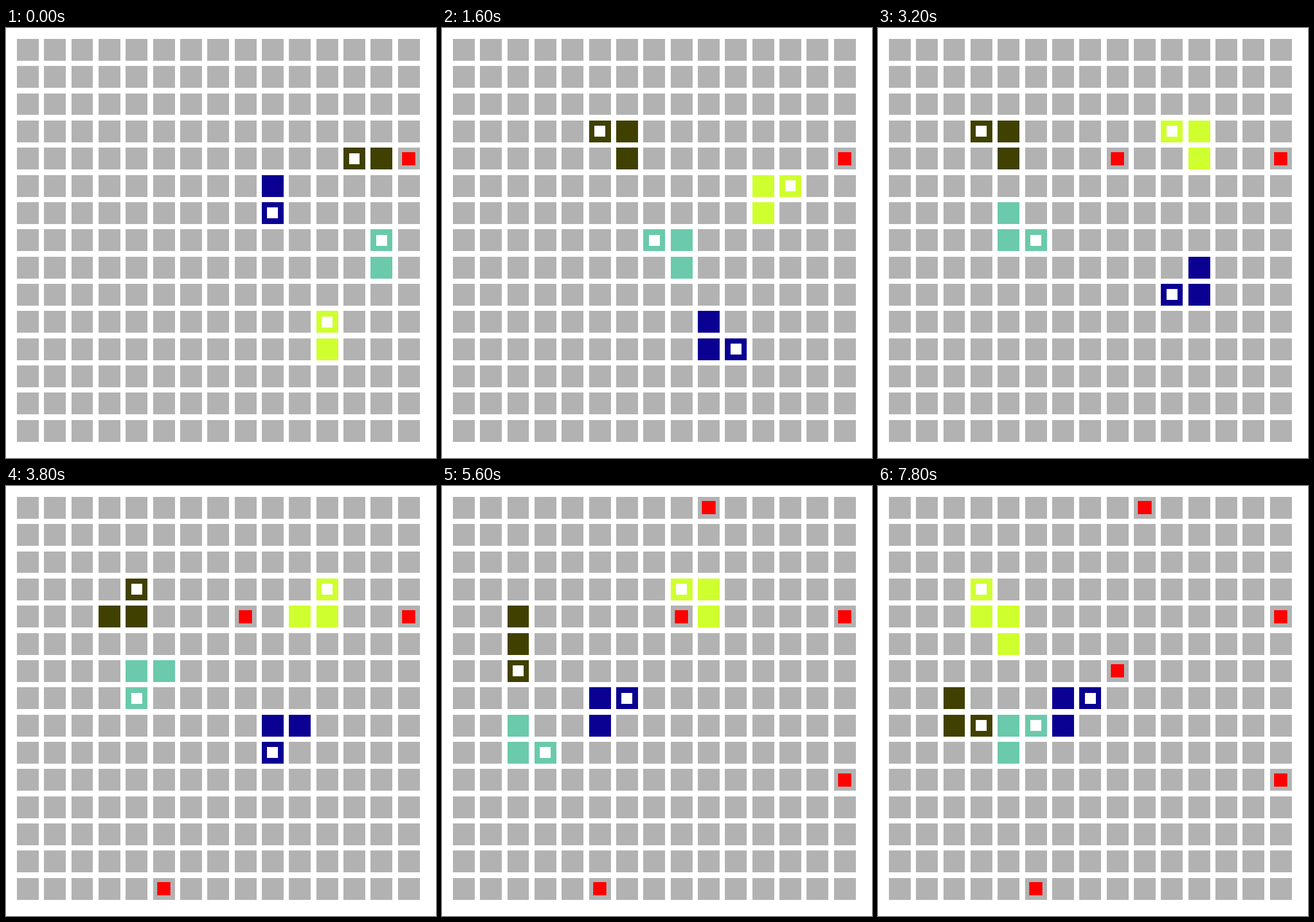
An HTML page with a canvas that plays this animation: 748 by 748 pixels, repeating every 8 s.

```html
<!DOCTYPE html>
<html>
<head>
<meta charset="utf-8">
<title>Snakes</title>
<style>
  html, body { margin: 0; width: 100%; height: 100%; overflow: hidden; background: #fff; }
  canvas { display: block; }
</style>
</head>
<body>
<canvas id="board" width="748" height="748"></canvas>
<script>
const ctx = document.getElementById('board').getContext('2d');
const SIZE = 15, STEP_MS = 200, STEPS = 40;
const UNIT = 748 / 79; // a cell is 4 units wide with a gap of 1
const DIRECTIONS = { L: [-1, 0], R: [1, 0], U: [0, -1], D: [0, 1] };

// Each path starts at the tail; its first move leads to the opening head position.
const snakes = [
  { color: '#404000', start: [13, 4], path: 'L LLLLLL ULULDL DRULDRU LULDRDLDD RRDLLU LDRDR' },
  { color: '#0a0091', start: [9, 5], path: 'D DDDLDR DRURUR ULDLULD LULDLULUR URDDRD LULUR' },
  { color: '#6acaab', start: [13, 8], path: 'U LLLLDL ULULDL ULDRULD RULDLDLDR DRULLU RDRUR' },
  { color: '#cfff2e', start: [11, 11], path: 'U UURUUL URULUR DLULDRU LDRULDLUL DLLLLL DRULU', growsAt: 30 },
];
const foods = [
  { cell: [14, 4], from: 0 },
  { cell: [8, 4], from: 11, until: 29 },
  { cell: [5, 14], from: 19 },
  { cell: [9, 0], from: 22 },
  { cell: [14, 10], from: 27 },
  { cell: [8, 6], from: 37 },
];

for (const snake of snakes) {
  snake.trail = [snake.start];
  for (const move of snake.path.replaceAll(' ', '')) {
    const [x, y] = snake.trail.at(-1), [dx, dy] = DIRECTIONS[move];
    snake.trail.push([x + dx, y + dy]);
  }
}

// Fills a square inside a cell, inset by some units and snapped to whole pixels.
function fillCell([col, row], color, inset = 0) {
  const edge = (index, offset) => Math.round((2 + index * 5 + offset) * UNIT);
  const x = edge(col, inset), y = edge(row, inset);
  ctx.fillStyle = color;
  ctx.fillRect(x, y, edge(col, 4 - inset) - x, edge(row, 4 - inset) - y);
}

function draw(step) {
  ctx.fillStyle = '#fff';
  ctx.fillRect(0, 0, 748, 748);
  for (let row = 0; row < SIZE; row++)
    for (let col = 0; col < SIZE; col++) fillCell([col, row], '#b2b2b2');

  for (const { cell, from, until = STEPS } of foods)
    if (step >= from && step < until) fillCell(cell, '#f00', 0.78);

  for (const { color, trail, growsAt = STEPS } of snakes) {
    const length = step >= growsAt ? 4 : 3, end = step + 2;
    const body = trail.slice(Math.max(0, end - length), end);
    for (const cell of body) fillCell(cell, color);
    fillCell(body.at(-1), '#fff', 1);
  }
}

const startTime = performance.now();
function tick() {
  const elapsed = performance.now() - startTime;
  draw(Math.floor(elapsed / STEP_MS) % STEPS);
  requestAnimationFrame(tick);
}
tick();
</script>
</body>
</html>
```
